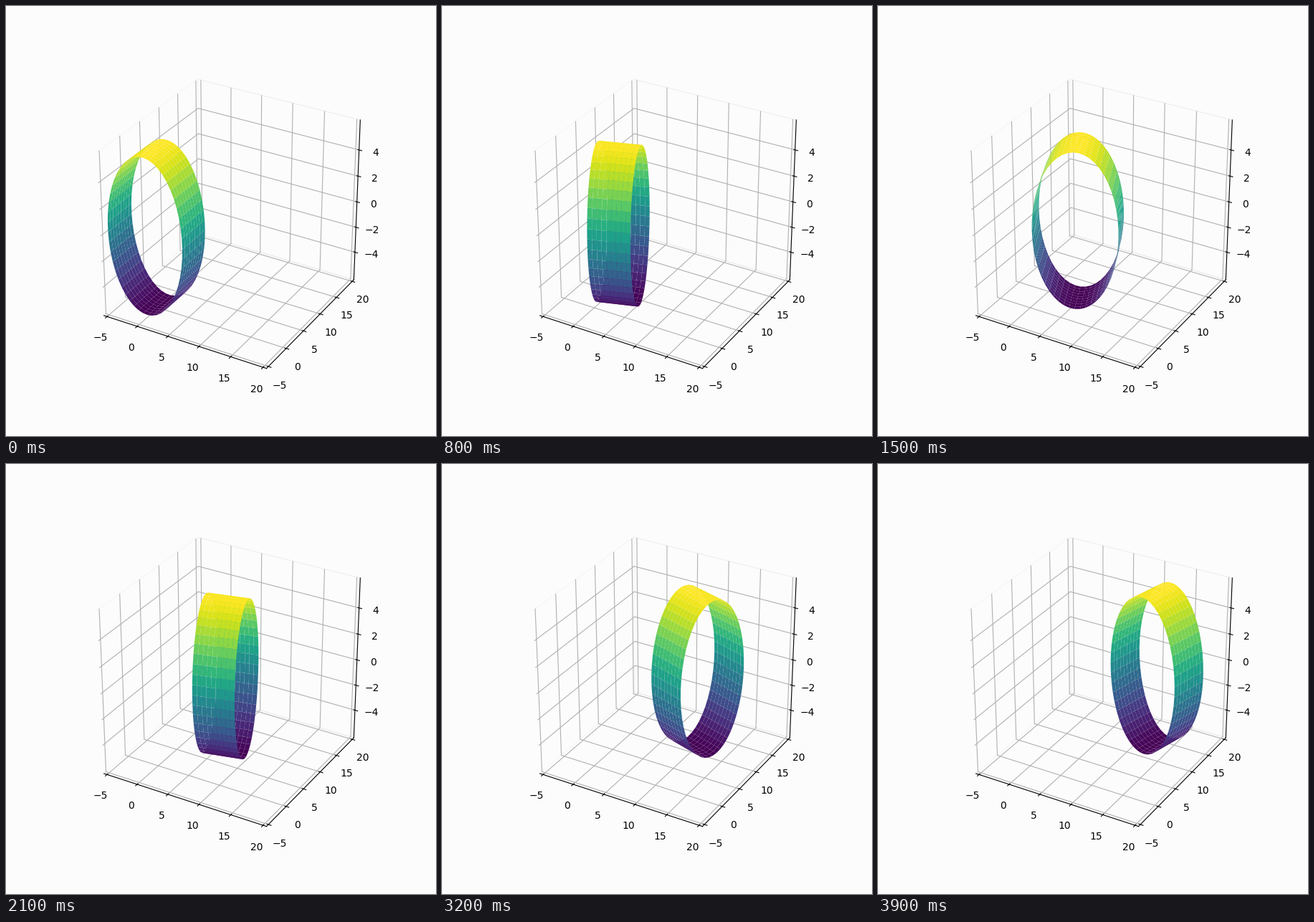
A matplotlib script for the animation above (4 s loop, 600 by 600 pixels).

```python
import numpy as np
import matplotlib.pyplot as plt
from matplotlib.animation import FuncAnimation

FRAMES, INTERVAL = 40, 100
RADIUS, WIDTH = 6, 6
BACKGROUND = "#fcfcfc"

theta, offset = np.meshgrid(np.linspace(0, 2 * np.pi, 50),
                            np.linspace(-WIDTH / 2, WIDTH / 2, 10))
height = RADIUS * np.sin(theta)
across = RADIUS * np.cos(theta)

fig = plt.figure(figsize=(6, 6), dpi=100, facecolor=BACKGROUND)
ax = fig.add_subplot(projection="3d", facecolor=BACKGROUND)

# Unit cube that fills the subplot area without being squared.
ax.set_box_aspect((1, 1, 1), zoom=np.sqrt(3) / 1.8294640721620434)
ax.apply_aspect = lambda position=None: None

margin = 1 / 48
ax.set_xlim(-5, 20, view_margin=margin)
ax.set_ylim(-5, 20, view_margin=margin)
ax.set_zlim(height.min(), height.max(), view_margin=margin)
ax.set_xticks(range(-5, 21, 5))
ax.set_yticks(range(-5, 21, 5))
ax.set_zticks(range(-4, 5, 2))
for axis in (ax.xaxis, ax.yaxis, ax.zaxis):
    axis.pane.fill = False

rings = []


def draw(i):
    """Slide the ring along the diagonal while it turns about the vertical."""
    while rings:
        rings.pop().remove()
    turn = 3 * np.pi * i / FRAMES
    center = np.sqrt(2) * turn
    c, s = np.cos(turn), np.sin(turn)
    x = center + across * c - offset * s
    y = center + across * s + offset * c
    rings.append(ax.plot_surface(x, y, height, cmap="viridis"))
    return rings


anim = FuncAnimation(fig, draw, frames=FRAMES, interval=INTERVAL,
                     init_func=lambda: rings, repeat=True)
plt.show()
```
